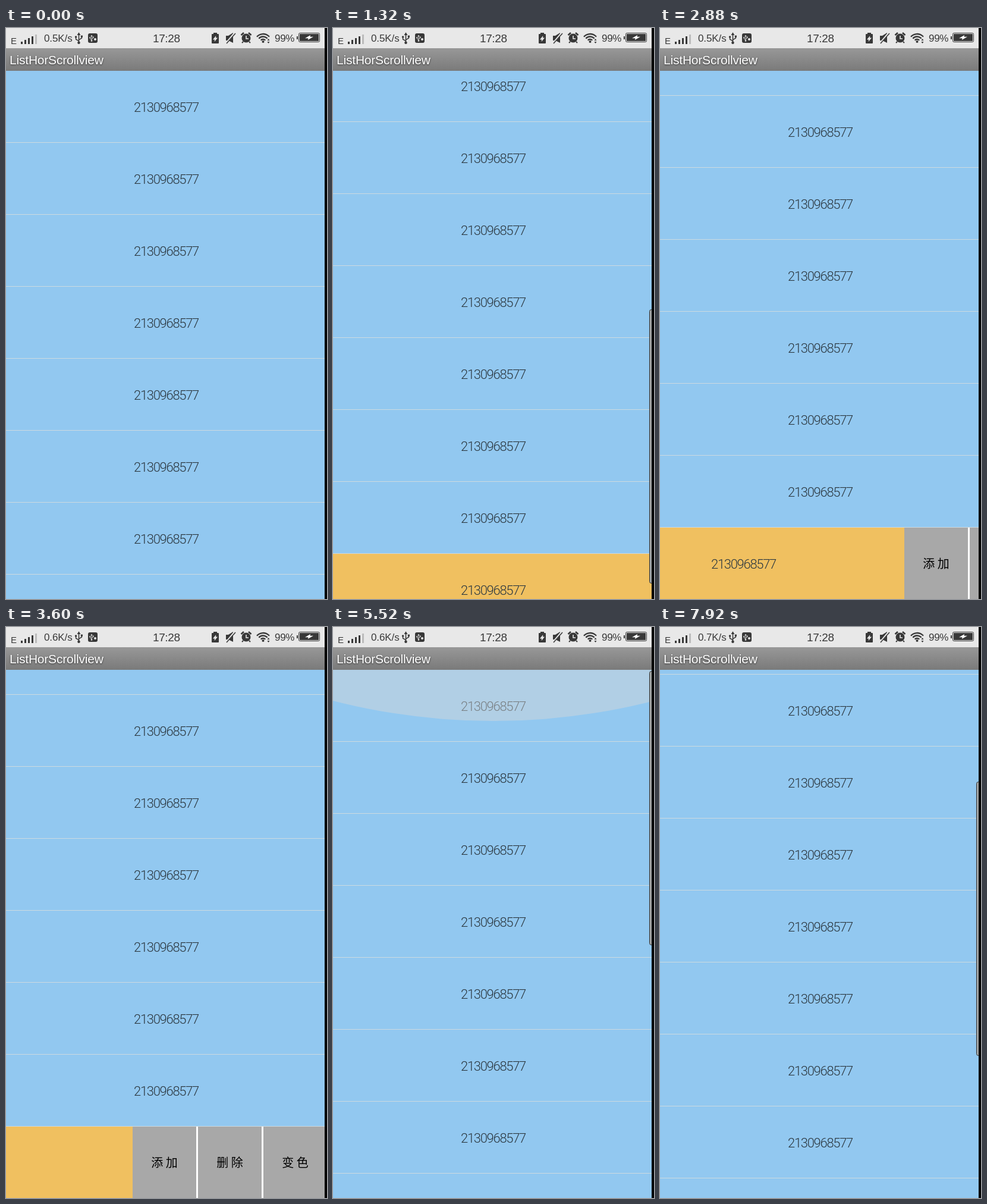
These frames come from a looping animation (540 px wide and 960 px high, 8000 ms). An HTML page with a canvas:

```html
<!DOCTYPE html>
<html lang="zh-CN">
<head>
<meta charset="utf-8">
<title>ListHorScrollview</title>
<style>
html, body { margin: 0; width: 100%; height: 100%; overflow: hidden; background: #000; }
canvas { display: block; }
</style>
</head>
<body>
<canvas id="stage" width="540" height="960"></canvas>
<script>
const ctx = document.getElementById('stage').getContext('2d');
const LOOP = 8000, STEP = 120;
const W = 540, H = 960, EDGE = 536, TOP = 72;
const ROWS = 14, PITCH = 121, ROW_H = 120;
const VIEW = H - TOP, TOTAL = ROWS * PITCH - 1, MAX = TOTAL - VIEW;
const PANEL = 327;
const SANS = '"Liberation Sans", Arial, sans-serif';
const THIN = 'Roboto, "Liberation Sans", sans-serif';
const CJK = '"Noto Sans CJK SC", "Noto Sans CJK", sans-serif';
const INK = '#383838', PAPER = '#e8e8e8';
const BLUE = '#92c8f0', ORANGE = '#f0c060';

// Smooth rise from 0 to 1 between two times
function ramp(t, from, to) {
  const x = Math.min(1, Math.max(0, (t - from) / (to - from)));
  return x * x * (3 - 2 * x);
}

// Rise to 1 at the peak, then fall back to 0
const pulse = (t, from, peak, to) => ramp(t, from, peak) - ramp(t, peak, to);

// Rise, stay, and fall again
const hold = (t, from, up, down, to) => ramp(t, from, up) - ramp(t, down, to);

function pose(t) {
  return {
    scroll: Math.round(MAX * hold(t, 0, 1538, 4800, 5400)
      - 96 * pulse(t, 6000, 6600, 6960) + 355 * ramp(t, 7680, 7920)),
    first: Math.round(PANEL * ramp(t, 6960, 7560)),
    last: Math.round(PANEL * hold(t, 2520, 3360, 4200, 4320)),
    topGlow: pulse(t, 5280, 5520, 6120),
    endGlow: pulse(t, 1560, 2040, 2400),
    bar: hold(t, 0, 120, 2160, 2400) + hold(t, 4800, 4920, 5640, 6000) + ramp(t, 7680, 7800),
    speed: 0.5 + (t >= 3000 ? 0.1 : 0) + (t >= 6120 ? 0.1 : 0)
  };
}

function box(x, y, w, h, fill) {
  ctx.fillStyle = fill;
  ctx.fillRect(x, y, w, h);
}

function rounded(x, y, w, h, r, fill, stroke) {
  ctx.beginPath();
  ctx.roundRect(x, y, w, h, r);
  ctx.fillStyle = fill;
  ctx.fill();
  if (!stroke) return;
  ctx.strokeStyle = stroke;
  ctx.lineWidth = 1;
  ctx.stroke();
}

function trace(points) {
  ctx.beginPath();
  points.forEach(([x, y]) => ctx.lineTo(x, y));
}

function poly(points, fill) {
  trace(points);
  ctx.fillStyle = fill;
  ctx.fill();
}

function line(points, color, width) {
  trace(points);
  ctx.strokeStyle = color;
  ctx.lineWidth = width;
  ctx.stroke();
}

function disc(x, y, r, fill) {
  ctx.beginPath();
  ctx.arc(x, y, r, 0, 7);
  ctx.fillStyle = fill;
  ctx.fill();
}

function label(str, x, y, font, color, gap = 0, align = 'left') {
  ctx.font = font;
  ctx.letterSpacing = gap + 'px';
  ctx.textAlign = align;
  ctx.fillStyle = color;
  ctx.fillText(str, x, y);
}

// Two mirrored triangles
function bolt(x, y, w, h, color) {
  for (const d of [1, -1]) {
    poly([[x + d * w * 0.3, y - d * h], [x - d * w, y + d * h * 0.3], [x + d, y + d * h * 0.3]], color);
  }
}

function usb(x, y, s, color) {
  ctx.save();
  ctx.translate(x, y);
  ctx.scale(s, s);
  line([[0, -7], [0, 8]], color, 1.6);
  line([[0, 5], [-5, 2], [-5, -2]], color, 1.5);
  line([[0, 3], [5, 0], [5, -3]], color, 1.5);
  poly([[0, -10], [-3, -5], [3, -5]], color);
  disc(-5, -2, 1.8, color);
  box(3.4, -4.5, 3.2, 3.2, color);
  disc(0, 8, 2.3, color);
  ctx.restore();
}

function alarm(x, y) {
  disc(x, y + 1, 7.5, INK);
  for (const d of [-1, 1]) {
    line([[x + d * 8.5, y - 4], [x + d * 4, y - 8]], INK, 2.6);
    line([[x + d * 5, y + 7], [x + d * 7, y + 9]], INK, 2);
  }
  line([[x, y - 3], [x, y + 2], [x + 4, y + 2]], PAPER, 1.6);
}

function mute(x, y) {
  box(x, y - 4, 5, 8, INK);
  poly([[x + 4, y - 4], [x + 12, y - 9], [x + 12, y + 8], [x + 4, y + 4]], INK);
  line([[x + 15, y - 9], [x, y + 9]], PAPER, 3);
  line([[x + 16, y - 8], [x + 1, y + 9]], INK, 1.5);
}

function wifi(x, y) {
  for (let r = 5; r < 15; r += 4.5) {
    ctx.beginPath();
    ctx.arc(x, y, r, -Math.PI * 0.77, -Math.PI * 0.23);
    ctx.strokeStyle = INK;
    ctx.lineWidth = 2.3;
    ctx.stroke();
  }
  disc(x, y - 1, 2, INK);
  for (const d of [-1, 1]) {
    poly([[x + 7, y - 2 + d], [x + 11, y - 2 + d], [x + 9, y - 2 + 4 * d]], INK);
  }
}

function statusBar(speed) {
  box(0, 0, W, 34, PAPER);
  label('E', 8, 27, '15px ' + SANS, INK);
  for (let i = 0; i < 5; i++) {
    const h = 4 + 3 * i;
    box(25 + 6 * i, 27 - h, 3, h, i < 4 ? INK : '#bcbcbc');
  }
  label(speed.toFixed(1) + 'K/s', 64, 23, '17px ' + SANS, INK, -0.1);
  usb(122.5, 17, 0.98, INK);
  rounded(138, 9, 16, 16, 3, INK);
  usb(144, 17, 0.55, PAPER);
  disc(150, 19, 2, PAPER);
  label('17:28', 247, 24, '19px ' + SANS, INK, -0.4);

  rounded(346, 10, 12, 16, 1, INK);
  box(349, 8, 6, 3, INK);
  bolt(352, 18, 4, 5, PAPER);
  mute(370, 17);
  alarm(404, 16);
  wifi(432.5, 24);
  label('99%', 452, 23, '17px ' + SANS, INK, -0.3);

  box(489, 14, 2, 5, INK);
  rounded(492.5, 8.5, 35, 15, 2, PAPER, INK);
  box(494, 10, 32, 12, INK);
  bolt(510, 16, 7, 4, '#fff');
}

function titleBar() {
  const g = ctx.createLinearGradient(0, 34, 0, TOP);
  g.addColorStop(0, '#989898');
  g.addColorStop(1, '#7a7a7a');
  box(0, 34, W, TOP - 34, g);
  ctx.save();
  ctx.shadowColor = 'rgba(0,0,0,.6)';
  ctx.shadowBlur = 3;
  ctx.shadowOffsetY = 1;
  label('ListHorScrollview', 6, 61, '21px ' + SANS, '#fff', -0.2);
  ctx.restore();
}

function row(i, y, slide) {
  const last = i === ROWS - 1;
  box(0, y, W, ROW_H, last ? ORANGE : BLUE);
  label('2130968577', 269.5 - slide, y + 69, '300 22px ' + THIN, '#2c3840', -1.3, 'center');
  if (slide > 0) {
    box(W - slide, y, PANEL, ROW_H, '#fff');
    ['添 加', '删 除', '变 色'].forEach((name, k) => {
      const x = W - slide + 110 * k;
      box(x, y, 107, ROW_H, '#a8a8a8');
      label(name, x + 53.5, y + 68, '20px ' + CJK, '#000', 0, 'center');
    });
  }
  if (!last) box(0, y + ROW_H, W, 1, '#ccdae0');
}

// Shallow arc of light at a list edge; dir is 1 for the top and -1 for the bottom
function glow(depth, y, dir, alpha) {
  if (depth <= 0) return;
  const ry = depth * 8.1;
  ctx.beginPath();
  ctx.ellipse(270, y + dir * (depth - ry), 875, ry, 0, 0, 7);
  ctx.fillStyle = `rgba(216,216,216,${alpha})`;
  ctx.fill();
}

function scrollBar(scroll, alpha) {
  const y = TOP + 2 + Math.round(Math.max(0, scroll) / TOTAL * VIEW);
  ctx.globalAlpha = alpha;
  rounded(532.5, y + 0.5, 9, 460, 3, '#a4a8a8', '#303030');
  ctx.globalAlpha = 1;
}

function list(p) {
  box(0, TOP, W, VIEW, PAPER);
  for (let i = 0; i < ROWS; i++) {
    const y = TOP + i * PITCH - p.scroll;
    if (y > H || y + PITCH < TOP) continue;
    row(i, y, i === 0 ? p.first : i === ROWS - 1 ? p.last : 0);
  }
  glow(86 * p.topGlow, TOP, 1, 0.45 * p.topGlow);
  glow(39 * p.endGlow, H, -1, 0.14 * p.endGlow);
  scrollBar(p.scroll, p.bar);
}

// The bars are painted last and cover whatever the list leaves above its edge
function draw(t) {
  const p = pose(t);
  list(p);
  statusBar(p.speed);
  titleBar();
  box(EDGE, 0, W - EDGE, H, '#000');
}

const start = performance.now();
function tick() {
  const t = (performance.now() - start) % LOOP;
  draw(Math.floor(t / STEP) * STEP);
  requestAnimationFrame(tick);
}
tick();
</script>
</body>
</html>
```
